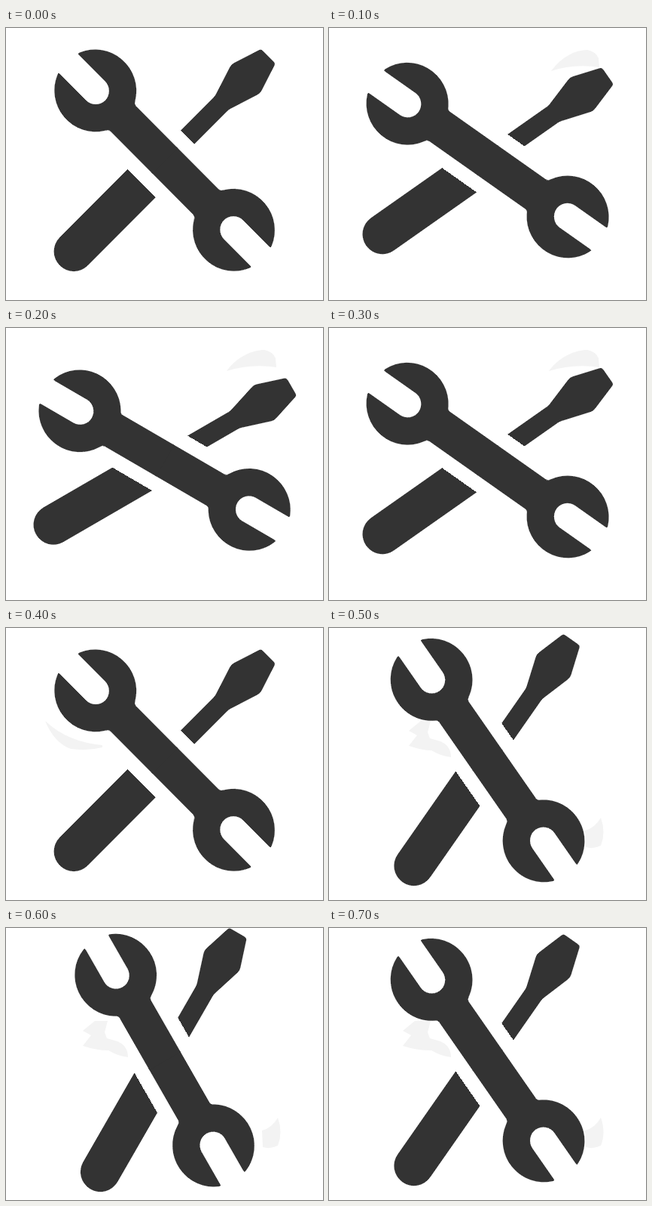
These frames come from a looping animation (421 by 360 pixels, 800 ms). An HTML page:

```html
<!DOCTYPE html>
<html lang="en">
<head>
<meta charset="utf-8">
<title>Tools</title>
<style>
  html, body { margin: 0; width: 100%; height: 100%; overflow: hidden; background: #fff; }
  svg { display: block; width: 421px; height: 360px; }
  g, rect { shape-rendering: crispEdges; }
  g { stroke: #333; stroke-width: .8; stroke-linejoin: round; }
</style>
</head>
<body>
<svg viewBox="0 0 421 360" fill="#333">
  <defs>
    <path id="half" d="M-1-23.5H78Q82-23.5 83.9-28A54.3 54.3 0 0 1 180.4-20.2Q181.6-18.2 179.4-18.2H129.6A18.2 18.2 0 0 0 129.6 18.2H179.4Q181.6 18.2 180.4 20.2A54.3 54.3 0 0 1 83.9 28Q82 23.5 78 23.5H-1Z"/>
  </defs>
  <g id="driver">
    <path d="M-20-26H-170.5A26 26 0 0 0-170.5 26H-20Z"/>
    <path d="M20-12.5H105Q108-12.5 111-13.5L149-25.6Q152.5-26.7 156-25.6L192-14Q194.4-13 194.4-10.5V10.5Q194.4 13 192 14L156 25.6Q152.5 26.7 149 25.6L111 13.5Q108 12.5 105 12.5H20Z"/>
  </g>
  <!-- keeps the screwdriver clear of the wrench -->
  <rect id="gap" x="-60" y="-43.4" width="120" height="86.4" fill="#fff"/>
  <path id="swish" fill="#f3f3f3"/>
  <g id="wrench">
    <use href="#half"/>
    <use href="#half" transform="rotate(180)"/>
  </g>
</svg>
<script>
  const STEP = 100;
  const tilts = [0, 10, 15, 10, 0, -10, -15, -10];

  const flick = x => `M${x} 57C${x + 14} 38 327 29 343 29Q354 31 358 40L359 52Q325 47 ${x} 57Z`;
  const arc = 'M52 123Q82 151 128 155V158Q108 163 86 160Q64 152 52 123Z';
  const puffs = x => `M${x + 16} 123L${x} 136L${x + 11} 142L${x} 156Q${x + 18} 162 136 162Q150 170 162 171Q162 156 148 150L134 146L131 138L135 123Z`
    + 'M340 268Q353 265 361 251Q368 271 361 288Q351 293 341 290Z';

  const swishes = ['', flick(295), flick(293), flick(292), arc, puffs(106), puffs(102), puffs(98)];

  const part = id => document.getElementById(id);
  const turn = (id, angle) =>
    part(id).setAttribute('transform', `translate(210.6 175.1) rotate(${angle})`);

  function draw(time) {
    const i = Math.floor(time / STEP) % tilts.length;
    turn('driver', tilts[i] - 45);
    turn('gap', 45.1 - tilts[i]);
    turn('wrench', 45.1 - tilts[i]);
    part('swish').setAttribute('d', swishes[i]);
  }

  const start = performance.now();
  function tick() {
    draw(performance.now() - start);
    requestAnimationFrame(tick);
  }
  tick();
</script>
</body>
</html>
```
